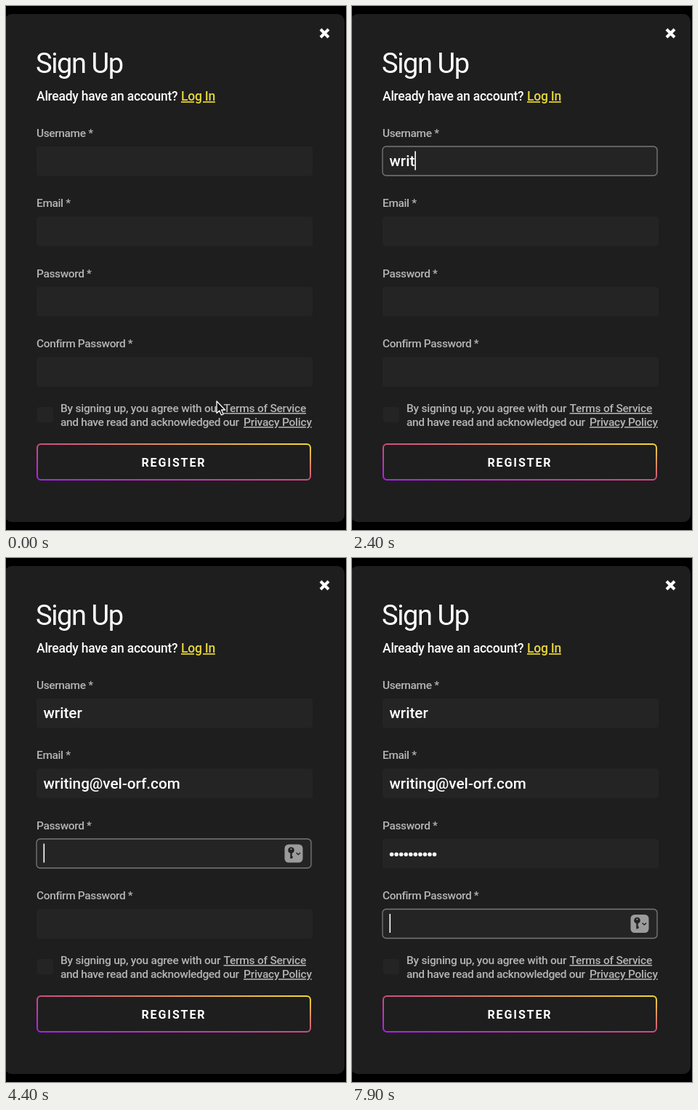
Write an HTML page that moves like this. It is 468 by 720 pixels and loops after 8 s.

```html
<!DOCTYPE html>
<html lang="en">
<head>
<meta charset="utf-8">
<title>Sign Up</title>
<style>
  html, body { margin: 0; width: 100%; height: 100%; overflow: hidden; background: #000; }
  svg { display: block; width: 468px; height: 720px; }
  text { font-family: Roboto, "Liberation Sans", sans-serif; white-space: pre; }
  .title { font-size: 38px; letter-spacing: -1.4px; fill: #fff; }
  .lead { font-size: 17.5px; font-weight: 500; letter-spacing: -.25px; fill: #fff; }
  .label, .terms { font-size: 15.5px; font-weight: 500; fill: #b4b4b4; }
  .label { letter-spacing: -.38px; }
  .terms { letter-spacing: -.24px; }
  .tight { letter-spacing: -.36px; }
  .link { text-decoration: underline; text-decoration-thickness: 1.3px; text-underline-offset: 1.2px; }
  .yellow { fill: #e6d53a; }
  .value { font-size: 20.7px; font-weight: 500; fill: #fff; }
  .button { font-size: 16px; font-weight: 700; letter-spacing: 1.9px; fill: #fff; }
</style>
</head>
<body>
<svg viewBox="0 0 468 720">
  <defs>
    <linearGradient id="rim" x1="0" y1="1" x2="1" y2="0">
      <stop offset="0" stop-color="#b01df0"/>
      <stop offset=".5" stop-color="#d04c80"/>
      <stop offset="1" stop-color="#f2d836"/>
    </linearGradient>
  </defs>
  <rect width="468" height="720"/>
  <rect x="-2" y="11" width="468" height="698" rx="10" fill="#1e1e1e"/>
  <path d="M433 32l11 11m0-11l-11 11" stroke="#fff" stroke-width="4"/>

  <text class="title" x="41" y="92">Sign Up</text>
  <text class="lead" x="42" y="130">Already have an account?</text>
  <text class="lead link yellow" x="241" y="130">Log In</text>

  <g id="fields"></g>

  <rect x="43" y="551" width="22" height="21" rx="3" fill="#242424"/>
  <text class="terms" x="75" y="558">By signing up, you agree with our</text>
  <text class="terms link" x="299.5" y="558">Terms of Service</text>
  <text class="terms tight" x="75" y="577">and have read and acknowledged our</text>
  <text class="terms link" x="327" y="577">Privacy Policy</text>

  <rect x="43" y="602" width="376" height="49" rx="5" fill="#1e1e1e" stroke="url(#rim)" stroke-width="2"/>
  <text class="button" x="186.5" y="632.7">REGISTER</text>

  <g id="focus">
    <rect x="42" y="0" width="378" height="40" rx="5" fill="#242424" stroke="#787878" stroke-width="1.3"/>
    <g id="keyIcon">
      <rect x="383.5" y="7.5" width="25" height="25" rx="5.5" fill="#9b9b9b"/>
      <circle cx="392.5" cy="15.5" r="4.3" fill="#222"/>
      <circle cx="392.5" cy="14" r="1.1" fill="#9b9b9b"/>
      <path d="M392.5 18v9m0-2h2.2" stroke="#222" stroke-width="2.4" fill="none"/>
      <path d="M399.5 19l2.8 2.6 2.8-2.6" stroke="#222" stroke-width="1.4" fill="none"/>
    </g>
  </g>
  <g id="values"></g>
  <rect id="caret" width="1.6" height="26" fill="#fff"/>

  <path id="arrow" d="M0 0V16.5L3.8 13L6.4 19L9.2 17.8L6.6 12H11.6Z" fill="#111" stroke="#fff" stroke-width="1.3" stroke-linejoin="round"/>
  <g id="beam" fill="none" stroke-linecap="round">
    <defs><path id="beamShape" d="M-3.5-9Q0-9 0-6.5Q0-9 3.5-9M0-6.5V6.5M-3.5 9Q0 9 0 6.5Q0 9 3.5 9M-2 2H2"/></defs>
    <use href="#beamShape" stroke="#fff" stroke-width="3.6"/>
    <use href="#beamShape" stroke="#111" stroke-width="1.3"/>
  </g>
</svg>
<script>
const LOOP = 8000, STEP = 100;
const NS = "http://www.w3.org/2000/svg";
const $ = id => document.getElementById(id);

function add(parent, tag, attrs, text = "") {
  const node = document.createElementNS(NS, tag);
  for (const name in attrs) node.setAttribute(name, attrs[name]);
  node.textContent = text;
  return parent.appendChild(node);
}

const fieldY = i => 193 + i * 96.5;
["Username", "Email", "Password", "Confirm Password"].forEach((label, i) => {
  const y = fieldY(i);
  add($("fields"), "text", { class: "label", x: 42, y: y - 13.4 }, label + " *");
  add($("fields"), "rect", { x: 42, y, width: 380, height: 40.5, rx: 4, fill: "#242424" });
});

const USER = "writer", MAIL = "writing@vel-orf.com";
const userKeys = [1600, 1800, 2000, 2300, 2500, 2800];
const dotKeys = [4600, 4900, 5200, 5400, 5600, 6000, 6400, 6700, 7100, 7400];
const focusTimes = [1200, 3200, 4200, 7700];
const passed = (times, t) => times.filter(at => at <= t).length;

const valueTexts = [0, 1].map(i =>
  add($("values"), "text", { class: "value", x: 51.5, y: fieldY(i) + 27.3 }));
const dots = dotKeys.map((_, i) =>
  add($("values"), "circle", { cx: 54.6 + i * 6.55, cy: fieldY(2) + 21.3, r: 2.75, fill: "#fff" }));

const pointerPath = [[0, 290, 543], [100, 262, 427], [300, 262, 427], [800, 217, 212]];
function pointerAt(t) {
  const next = pointerPath.findIndex(p => p[0] > t);
  if (next < 0) return pointerPath.at(-1).slice(1);
  const [t0, x0, y0] = pointerPath[next - 1], [t1, x1, y1] = pointerPath[next];
  const k = (t - t0) / (t1 - t0);
  return [x0 + (x1 - x0) * k, y0 + (y1 - y0) * k];
}

const show = (node, on) => node.setAttribute("visibility", on ? "visible" : "hidden");
const place = (node, x, y) => node.setAttribute("transform", `translate(${x} ${y})`);

function render(t) {
  const active = passed(focusTimes, t) - 1;
  const mailCount = t < 3500 ? 0 : Math.min(MAIL.length, (Math.floor((t - 3500) / STEP) + 1) * 4);
  const dotCount = passed(dotKeys, t);
  valueTexts[0].textContent = USER.slice(0, passed(userKeys, t));
  valueTexts[1].textContent = MAIL.slice(0, mailCount);
  dots.forEach((dot, i) => show(dot, i < dotCount));

  show($("focus"), active >= 0);
  show($("caret"), active >= 0);
  show($("keyIcon"), active >= 2);
  if (active >= 0) {
    const y = fieldY(active);
    const typed = valueTexts[active];
    const width = typed ? (typed.textContent && typed.getComputedTextLength()) : active === 2 ? dotCount * 6.7 : 0;
    place($("focus"), 0, y);
    place($("caret"), 51.5 + Number(width), y + 6.5);
  }

  const [x, y] = pointerAt(t);
  const overField = [0, 1, 2, 3].some(i => y >= fieldY(i) && y <= fieldY(i) + 41);
  const moving = t < userKeys[0];
  show($("arrow"), moving && !overField);
  show($("beam"), moving && overField);
  place($("arrow"), x, y);
  place($("beam"), x, y);
}

const start = performance.now();
function frame() {
  const t = (performance.now() - start) % LOOP;
  render(Math.floor(t / STEP) * STEP);
  requestAnimationFrame(frame);
}
frame();
</script>
</body>
</html>
```
